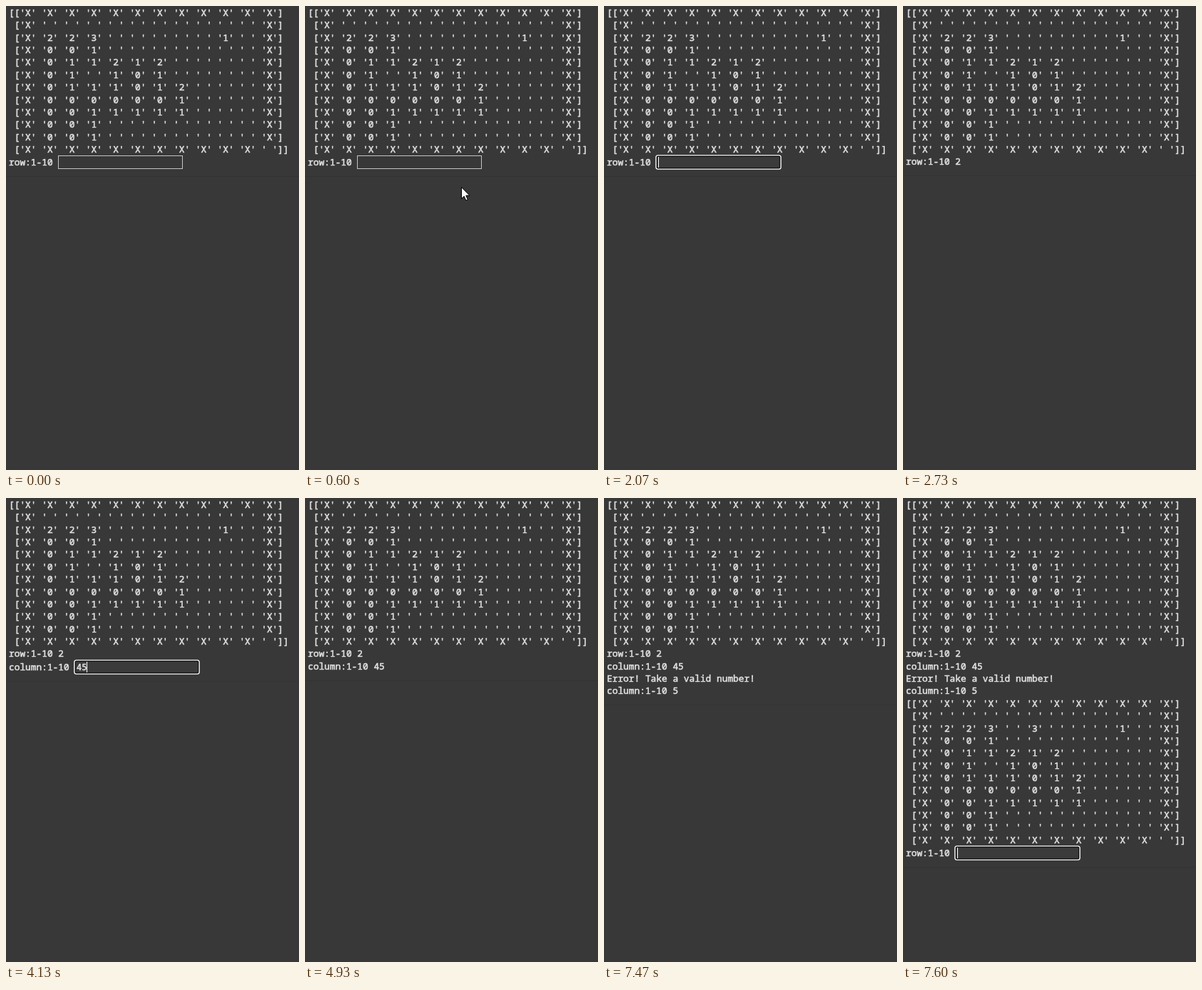
Animation, 411 px wide and 649 px high, one loop 8 s. Source, as an HTML page with a canvas:

```html
<!DOCTYPE html>
<html lang="en">
<head>
<meta charset="utf-8">
<title>Grid prompt</title>
<style>
html, body { margin: 0; width: 100%; height: 100%; overflow: hidden; background: #383838; }
canvas { display: block; width: 411px; height: 649px; }
</style>
</head>
<body>
<canvas id="stage" width="411" height="649"></canvas>
<script>
const ctx = document.getElementById('stage').getContext('2d');
const LOOP = 8000, LEFT = 4, PITCH = 17.36, STEP = 1000 / 15;
const BG = '#383838', INK = '#e2e2e2';
const FAMILY = '"Noto Sans Mono", "DejaVu Sans Mono", monospace';
const OUTPUT = { font: '12.833px ' + FAMILY, advance: 7.7 };
const FIELD = { font: '11.917px ' + FAMILY, advance: 7.15 };

const CELLS = ['XXXXXXXXXXXX', 'X', 'X223     1', 'X001', 'X011212', 'X01 101',
  'X0111012', 'X0000001', 'X0011111', 'X001', 'X001', 'XXXXXXXXXXX '];

function board(cells) {
  return cells.map((row, i) => {
    const full = row.length < 12 ? row.padEnd(11) + 'X' : row;
    const body = [...full].map(c => `'${c}'`).join(' ');
    return (i ? ' [' : '[[') + body + (i === 11 ? ']]' : ']');
  });
}

const first = board(CELLS);
const second = board(CELLS.map((row, i) => i === 2 ? 'X223 3   1' : row));
const ROW = 'row:1-10 ', COL = 'column:1-10 ';
const answered = [...first, ROW + '2'];
const failed = [...answered, COL + '45', 'Error! Take a valid number!'];
const solved = [...failed, COL + '5'];

// Each scene: start time, printed lines, then prompt, typed text, caret, focus
const scenes = [
  [0, first, ROW, '', false, false],
  [930, first, ROW, '', true, true],
  [1530, first, ROW, '', false, true],
  [2070, first, ROW, '', true, true],
  [2200, first, ROW, '2', true, true],
  [2730, answered],
  [2870, answered, COL, '', true, true],
  [3400, answered, COL, '', false, true],
  [3930, answered, COL, '', true, true],
  [4000, answered, COL, '4', true, true],
  [4130, answered, COL, '45', true, true],
  [4670, answered, COL, '45', false, true],
  [4930, [...answered, COL + '45']],
  [5070, failed, COL, '', true, true],
  [5600, failed, COL, '', false, true],
  [6130, failed, COL, '', true, true],
  [6670, failed, COL, '', false, true],
  [7000, failed, COL, '5', true, true],
  [7470, solved],
  [7600, [...solved, ...second], ROW, '', true, true]
];

// A thin outline gives the letters a medium weight
function write(text, x, y, style) {
  ctx.font = style.font;
  ctx.fillStyle = ctx.strokeStyle = INK;
  ctx.lineWidth = 0.55;
  ctx.lineJoin = 'round';
  [...text].forEach((c, i) => {
    if (c === ' ') return;
    ctx.fillText(c, x + i * style.advance, y);
    ctx.strokeText(c, x + i * style.advance, y);
  });
}

function panel(x, y, w, h, r, color) {
  ctx.fillStyle = color;
  ctx.beginPath();
  ctx.roundRect(x, y, w, h, r);
  ctx.fill();
}

function drawField(x, y, typed, caret, focus) {
  if (focus) {
    panel(x - 0.8, y + 0.2, 176.6, 20.6, 3.5, '#ffffff');
    panel(x + 0.6, y + 1.6, 173.8, 17.8, 2, '#101010');
    panel(x + 2, y + 3, 171, 15, 0, '#3b3b3b');
  } else {
    panel(x, y + 1, 175, 19, 0, '#c4c4c4');
    panel(x + 1, y + 2, 173, 17, 0, BG);
  }
  write(typed, x + 3, y + 15, FIELD);
  if (caret) {
    ctx.fillStyle = '#ffffff';
    ctx.fillRect(x + 3 + Math.floor(typed.length * FIELD.advance), y + 3, 1, 15);
  }
}

function drawArrow(x, y) {
  const pts = [[0, 0], [0, 16], [3.7, 12.6], [6.3, 18.4], [8.8, 17.3], [6.3, 11.6], [11.3, 11.6]];
  ctx.beginPath();
  pts.forEach(([px, py]) => ctx.lineTo(x + px + 0.5, y + py + 0.5));
  ctx.closePath();
  ctx.fillStyle = '#ffffff';
  ctx.fill();
  ctx.strokeStyle = '#000000';
  ctx.lineWidth = 1;
  ctx.stroke();
}

function drawBeam(x, y) {
  ctx.fillStyle = '#c8c8c8';
  ctx.fillRect(x, y - 6, 1, 13);
  for (const edge of [-7, 7]) {
    ctx.fillRect(x - 2, y + edge, 2, 1);
    ctx.fillRect(x + 1, y + edge, 2, 1);
  }
}

function drawPointer(t) {
  const n = Math.floor((t + 4) / STEP);
  if (n < 1 || n > 18) return;
  if (n <= 9) {
    const rest = ((9 - n) / 8) ** 2;
    drawArrow(Math.round(219 + 80 * rest), Math.round(253 + 385 * rest));
  } else if (n <= 12) {
    drawArrow(219, 253 - (n - 9) * 7);
  } else if (n === 13) {
    drawBeam(220, 223);
  } else if (n <= 16) {
    drawBeam(220, 219);
  } else if (n === 17) {
    drawBeam(238, 220);
  } else {
    drawArrow(271, 222);
  }
}

function draw(t) {
  const [, lines, prompt, typed, caret, focus] = scenes.findLast(s => s[0] <= t);
  const baseline = i => Math.round(14.03 + PITCH * i);
  ctx.fillStyle = BG;
  ctx.fillRect(0, 0, 411, 649);
  lines.forEach((line, i) => write(line, LEFT, baseline(i), OUTPUT));

  let edge = baseline(lines.length - 1) + 15;
  if (prompt) {
    const y = Math.round(208.2 + PITCH * (lines.length - 12));
    edge = y + 30;
    write(prompt, LEFT, y + 15, OUTPUT);
    drawField(Math.round(LEFT + prompt.length * OUTPUT.advance), y, typed, caret, focus);
  }
  ctx.fillStyle = '#333333';
  ctx.fillRect(0, edge, 411, 1);
  drawPointer(t);
}

const start = performance.now();
function tick() {
  draw((performance.now() - start) % LOOP);
  requestAnimationFrame(tick);
}
tick();
</script>
</body>
</html>
```
